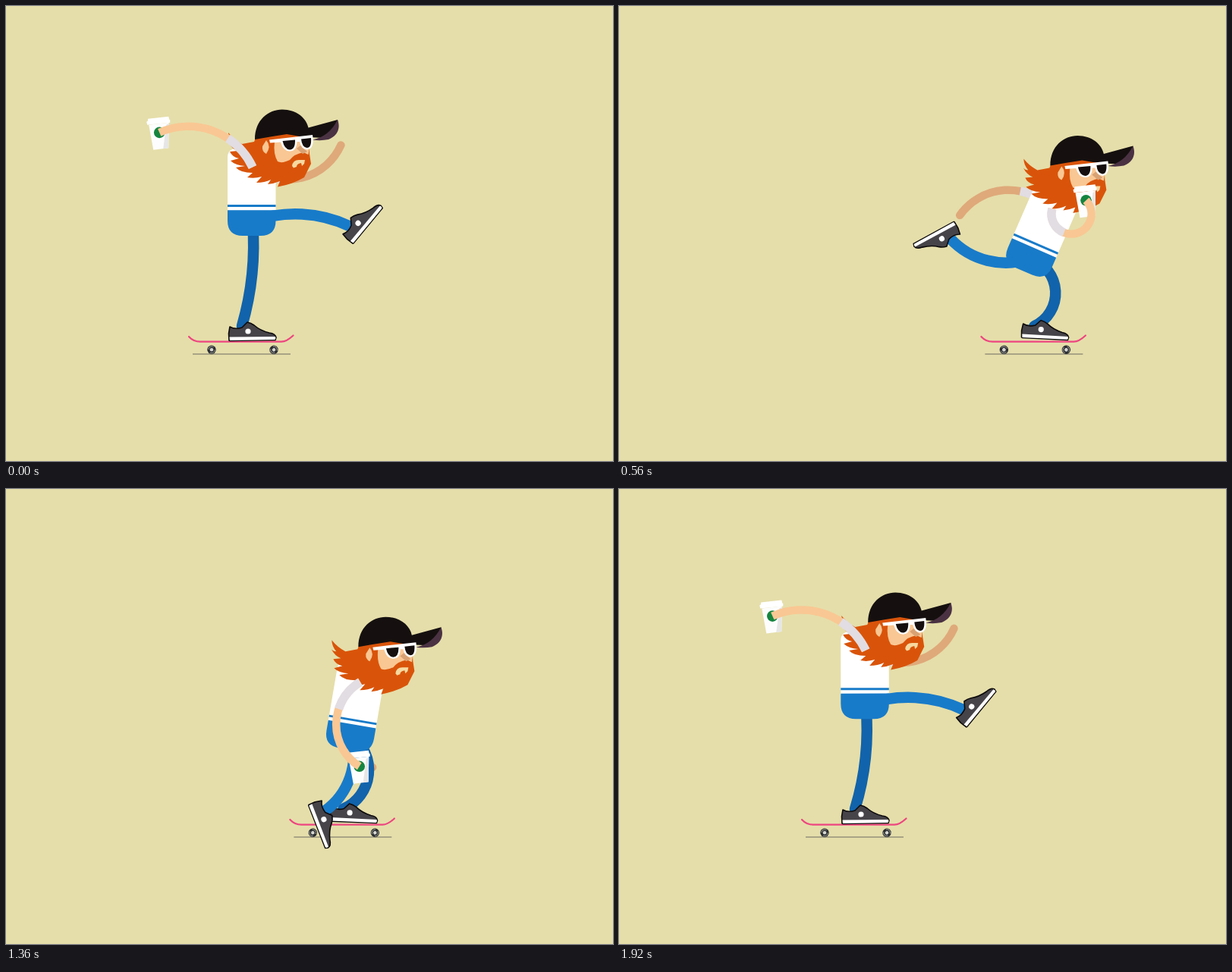
Recreate the animation shown at these times as an HTML page. Size 800 by 600 pixels, loop 1.96 s.

```html
<!DOCTYPE html>
<html lang="en">
<head>
<meta charset="utf-8">
<title>Skater with coffee</title>
<style>
  html, body { margin: 0; width: 100%; height: 100%; overflow: hidden; background: #e5deaa; }
  svg { display: block; width: 100vw; height: 100vh; }
  .limb { fill: none; stroke-width: 10.5; }
  .sleeve { fill: none; stroke: #e2dde2; stroke-width: 11.5; stroke-dasharray: 35 200; }
  .leg { stroke-width: 14.5; stroke-linecap: round; }
</style>
</head>
<body>
<svg viewBox="0 0 800 600">
  <defs>
    <g id="shoe">
      <path d="M-15 17L-15.500 8L-14 -1Q-7 3 2 0L9 -7Q14 -6 18 -3Q26 4 38 7Q46 8 47 13L46 16.500L-14 17.500Z"
            fill="#474449" stroke="#0c0a0b" stroke-width="1.600" stroke-linejoin="round"/>
      <path d="M-14.500 12.500L46 12Q47 15.500 45 16L-14 17Z" fill="#fff"/>
      <circle cx="10" cy="5" r="3.600" fill="#fff"/>
    </g>
    <g id="wheel">
      <circle r="5.700" fill="#2a2d31"/>
      <circle r="4.300" fill="none" stroke="#b9b8ae" stroke-width=".8" stroke-dasharray="9 4.500"/>
      <circle r="2.300" fill="#d5d5d0"/>
    </g>
  </defs>

  <g id="rider">
    <path id="farArm" class="limb" stroke="#dfa97a" stroke-linecap="round"/>
    <path id="farSleeve" class="sleeve" pathLength="100"/>

    <g id="trucks">
      <path d="M246 459H375" stroke="#969079" stroke-width="1.500"/>
      <g transform="translate(271 453.300)"><use id="wheelA" href="#wheel"/></g>
      <g transform="translate(353 453.300)"><use id="wheelB" href="#wheel"/></g>
    </g>
    <path id="deck" d="M241 436Q247 442.700 256 442.700H363Q370 442.500 378.500 434.500" fill="none"
          stroke="#ee4580" stroke-width="2.200" stroke-linecap="round"/>

    <path id="standLeg" class="limb leg" stroke="#1163ab"/>
    <g id="standShoe"><use href="#shoe" x="-47" y="-17"/></g>

    <g id="torso">
      <path d="M-33 -13V-84Q-33 -96 -21 -96H19Q30.500 -96 30.500 -84V-13Z" fill="#fff"/>
      <path d="M-33 -22H30.500V-19H-33ZM-33 -14.700H30.500V-1Q30.500 19 10.500 19H-13Q-33 19 -33 -1Z" fill="#187bc9"/>
    </g>
    <path id="kickLeg" class="limb leg" stroke="#187bc9"/>
    <use id="kickShoe" href="#shoe"/>

    <g id="head">
      <path fill="#d9540a" d="M329 174L327 179L311 182Q300 176 293 167Q293 175 299 182Q295 182 292.500 179
        Q297 188 305 191L295 192Q298 199 307 201L296 204Q302 210 315 211L303 213Q309 220 325 220L318 226
        Q327 228 337 225L330 233Q341 233 349 229L345 235Q354 234 361 231L358 238.500Q378 235 393 226
        L402 208L400 195L399 174L370 167Z"/>
      <path fill="#f9c793" d="M354 179L402 176L400 186L398.500 196L392 193Q380 195 374 203Q364 208 358 205Q352 195 354 179Z"/>
      <path fill="#d9a274" d="M383 188L388 184L397 192L391 195Z"/>
      <path fill="#f9c793" d="M343 177Q350 185 343 195Q337 192 338 185Z"/>
      <path fill="#f6d9a0" d="M377 211Q378 203 386 203L394 203L393 208L390 211L389 207Q383 208 383 212L379 213.500Z"/>
      <path fill="#15100f" d="M328 176C328 150 346 136.500 364 136.500C383 136.500 396 148 398.500 160.500
        L437 150L438 158L420 174L398 173Q385 172 370 169Q350 172 328 176Z"/>
      <path fill="#4b3243" d="M437 150C441 160 438 171 425 176Q415 178 404 176.500Q426 172 437 150Z"/>
      <path fill="#fff" d="M347 176.500L404 170Q407 188 397 189.500Q389 189 387 179L383.500 179Q383 192 373.500 191.500
        Q365 191 362 179.500L348 180.500Z"/>
      <path fill="#15100f" d="M364.500 178L381 176.500Q381.500 189 374 189.500Q367 189 364.500 178Z
        M389 175.500L402 174Q403 187 396.500 187Q390 186 389 175.500Z"/>
    </g>

    <g id="cup">
      <path d="M-14 -10L12.500 -13L12 20.500L-8 23Z" fill="#fdfdfd"/>
      <path d="M9 -10L12.500 -12L12 20.500L5 21.500Z" fill="#e6e6e6"/>
      <path d="M-15 -18L12 -21L13 -17L14 -16.500L14 -13L-16 -10L-17 -14L-15.500 -15Z" fill="#fff"/>
      <circle r="7.300" fill="#15853f"/>
    </g>
    <path id="nearArm" class="limb" stroke="#f9c793"/>
    <path id="nearSleeve" class="sleeve" pathLength="100"/>
  </g>
</svg>

<script>
const LOOP = 1960, STEP = 40, RAD = Math.PI / 180;
const PUSH = 240, TURN = 640, STOP = 1900, REACH = 241;

// Key poses beside the board. Limbs: angle in degrees and distance from their joint.
const poses = [
  { at: 0,    hip: [325, 284, 0],    head: [0, 0],      near: [200.4, 131], far: [-14, 120], foot: [3, 129] },
  { at: PUSH, hip: [326, 350, 0],    head: [-8, 49],    near: [46, 127],    far: [145, 88],  foot: [181, 111] },
  { at: 560,  hip: [306, 333, 23.5], head: [4, 34.5],   near: [-14, 46],    far: [176, 122], foot: [194, 109] },
  { at: 880,  hip: [306, 332, 24],   head: [5.5, 39],   near: [-9, 38],     far: [181, 157], foot: [194, 115] },
  { at: 1200, hip: [304, 338.5, 24], head: [4.5, 50],   near: [4, 83],      far: [176, 116], foot: [194, 80] },
  { at: 1520, hip: [339, 306, -4.5], head: [1.5, 11],   near: [178.5, 129], far: [-11, 113], foot: [19, 131] }
];

const $ = id => document.getElementById(id);
const set = (id, name, value) => $(id).setAttribute(name, value);
const place = (id, x, y, turn = 0) => set(id, 'transform', `translate(${x} ${y}) rotate(${turn})`);
const polar = ([x, y], angle, r) => [x + r * Math.cos(angle * RAD), y + r * Math.sin(angle * RAD)];

// Smooth periodic interpolation that never overshoots a pose.
function sample(part, t) {
  const n = poses.length;
  const pose = i => poses[(i + n) % n];
  const time = i => pose(i).at + LOOP * Math.floor(i / n);
  let i = n - 1;
  while (pose(i).at > t) i--;
  const span = time(i + 1) - time(i), u = (t - time(i)) / span, v = 1 - u;
  return pose(i)[part].map((from, c) => {
    const value = j => pose(j)[part][c];
    const rate = j => (value(j + 1) - value(j)) / (time(j + 1) - time(j));
    const slope = j => {
      const a = rate(j - 1), b = rate(j);
      return a * b > 0 ? 2 * a * b / (a + b) : 0;
    };
    return v * v * (1 + 2 * u) * from + u * u * (3 - 2 * u) * value(i + 1)
      + span * u * v * (v * slope(i) - u * slope(i + 1));
  });
}

// The board shoots forward, slows to a halt and rolls back ever faster.
function travel(t) {
  if (t < TURN) return REACH * Math.sin(Math.PI / 2 * t / TURN);
  const u = Math.min((t - TURN) / (STOP - TURN), 1);
  return REACH * (1 - u ** 1.44);
}

// A rubber limb is an arc that bows more as its ends come closer. Returns end and end direction.
function limb(ids, from, [angle, reach], length, bow) {
  const rise = bow * Math.sqrt(Math.max(length ** 2 - reach ** 2, 1));
  const r = (reach ** 2 / 4 + rise ** 2) / (2 * Math.abs(rise));
  const end = polar(from, angle, reach);
  const large = +(Math.abs(rise) > reach / 2), sweep = +(bow < 0);
  for (const id of ids) set(id, 'd', `M${from}A${r} ${r} 0 ${large} ${sweep} ${end}`);
  return { end, heading: angle - 2 * Math.atan2(2 * rise, reach) / RAD };
}

function draw(t) {
  const shift = travel(t), squeeze = Math.sin(Math.PI * Math.min(t / (2 * PUSH), 1));
  place('rider', shift, 0);
  place('trucks', 0, -1.2 * squeeze);
  place('deck', 0, squeeze);
  const roll = shift / 5.7 / RAD;
  place('wheelA', 0, 0, roll);
  place('wheelB', 0, 0, roll + 70);

  const [hx, hy, tilt] = sample('hip', t), hip = [hx, hy];
  const shoulder = polar(hip, tilt - 90, 71.5);
  place('torso', hx, hy, tilt);
  place('head', ...sample('head', t));

  limb(['farArm', 'farSleeve'], shoulder, sample('far', t), 174, .233);
  const hand = limb(['nearArm', 'nearSleeve'], shoulder, sample('near', t), 174, .233);
  place('cup', ...hand.end);

  const [swing, reach] = sample('foot', t);
  const stretch = 60 * Math.sin(Math.PI * Math.min(t / PUSH, 1));
  const foot = limb(['kickLeg'], hip, [swing, reach + stretch], 156, -.146);
  place('kickShoe', ...foot.end, foot.heading - 75);

  const dx = 311 - hx, dy = 422 - hy;
  limb(['standLeg'], hip, [Math.atan2(dy, dx) / RAD, Math.hypot(dx, dy)], 140.5, -.28);
  place('standShoe', 356, 441 + squeeze, (hy - 284) * .078);
}

const start = performance.now();
function tick() {
  const t = (performance.now() - start) % LOOP;
  draw(Math.floor(t / STEP) * STEP);
  requestAnimationFrame(tick);
}
tick();
</script>
</body>
</html>
```
